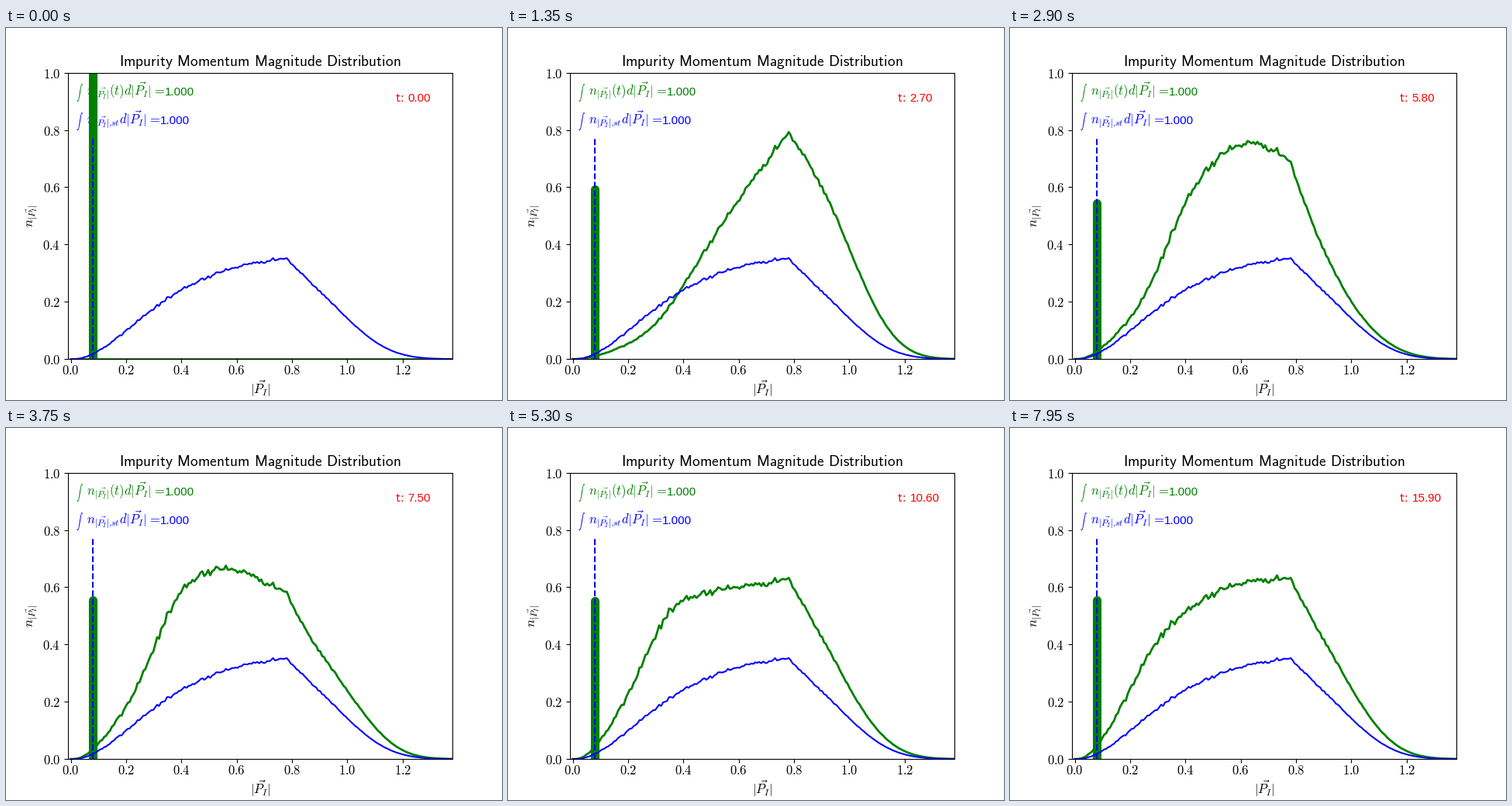
A matplotlib script for the animation above (8 s loop, 640x480 px).

```python
import matplotlib.pyplot as plt
import numpy as np
from matplotlib.animation import FuncAnimation

plt.rcParams["mathtext.fontset"] = "cm"

W, H = 640, 480
FRAMES, INTERVAL, DT = 160, 50, 0.1
STEP, X_MAX, X_PEAK, KINK = 0.0071, 1.38, 0.08, 0.78


def steady_density(x):
    """Saturating rise up to the kink, then a steepening decay, with grid noise."""
    r = np.minimum(x, KINK)
    rise = 0.366 * (1 - np.exp(-(r / 0.382) ** 1.643)) * (1 - np.exp(-r / 0.07))
    d = np.maximum(x - KINK, 0)
    noise = np.random.default_rng(7).normal(size=x.size) * 0.007 / (x + 0.08)
    return rise * np.exp(-2.9 * d - 25 * d ** 3) * (1 + noise)


def growth(x, t):
    """Damped oscillation towards a plateau, faster at larger momentum."""
    plateau = 1.73 + 0.75 * np.exp(-(x / 0.5) ** 2)
    omega = np.hypot(0.13, np.maximum(1.2 * x - 0.21, 0))
    gamma = 0.175 + 0.055 * np.tanh((x - 0.4) / 0.12)
    return plateau * (1 - np.exp(-(gamma * t) ** 1.5) * np.cos(omega * t))


def sans(text):
    text = text.replace(":", r"\hspace{-0.2}:\hspace{-0.2}")
    return r"$\mathsf{" + text.replace(" ", r"\hspace{0.38}") + "}$"


x = np.arange(0, X_MAX + STEP, STEP)
steady = steady_density(x)

fig = plt.figure(figsize=(W / 100, H / 100), dpi=100, facecolor="white")
ax = fig.add_axes([0.125, 0.11, 0.775, 0.77])
ax.set_xlim(-0.01, X_MAX)
ax.set_ylim(0, 1)
x_ticks = np.arange(7) * 0.2
y_ticks = np.arange(6) * 0.2
ax.set_xticks(x_ticks, [f"${v:.1f}$" for v in x_ticks], fontsize=12)
ax.set_yticks(y_ticks, [f"${v:.1f}$" for v in y_ticks], fontsize=12)
ax.tick_params(axis="x", pad=0.7)
ax.set_title(sans("Impurity Momentum Magnitude Distribution"), fontsize=14, pad=6)


def put(px, py, text, size=12, **style):
    """Text at a pixel position, measured from the top left."""
    return ax.text(px / W, 1 - py / H, text, fontsize=size,
                   transform=fig.transFigure, zorder=1, **style)


def integral(py, formula, right, color):
    put(90, py - 4, r"$\int$", size=6, va="center", color=color)
    put(103.8, py, f"${formula}d|\\vec{{P_I}}|\\hspace{{0.12}}=$", color=color)
    put(right, py, "1.000", size=11, ha="right", color=color,
        family="Liberation Sans")


put(328, 465.5, r"$|\vec{P_I}|$", ha="center", va="center")
put(34, 242.5, r"$n_{|\vec{P_I}|}$", ha="center", va="center", rotation=90)
integral(87.2, r"n_{|\vec{P_I}|}(t)", 243, "g")
integral(124.1, r"n_{|\vec{P_I}|{,}st}", 237, "b")
put(501.6, 94.6, sans("t:"), color="r")
clock = put(518.5, 94.6, "", size=11, color="r", family="Liberation Sans")

bar, = ax.plot([], [], "g", lw=8, solid_capstyle="round")
curve, = ax.plot([], [], "g", lw=2)
ax.plot(x, steady, "b", lw=1.5)
ax.plot([X_PEAK] * 2, [0, 1 - steady.sum() * STEP], "b--", lw=1.5)


def update(i):
    t = i * DT
    density = steady * growth(x, t)
    bar.set_data([X_PEAK] * 2, [0, 1 - density.sum() * STEP])
    curve.set_data(x, density)
    clock.set_text(f"{t:.2f}")
    return bar, curve, clock


anim = FuncAnimation(fig, update, frames=FRAMES, interval=INTERVAL, repeat=True)
plt.show()
```
